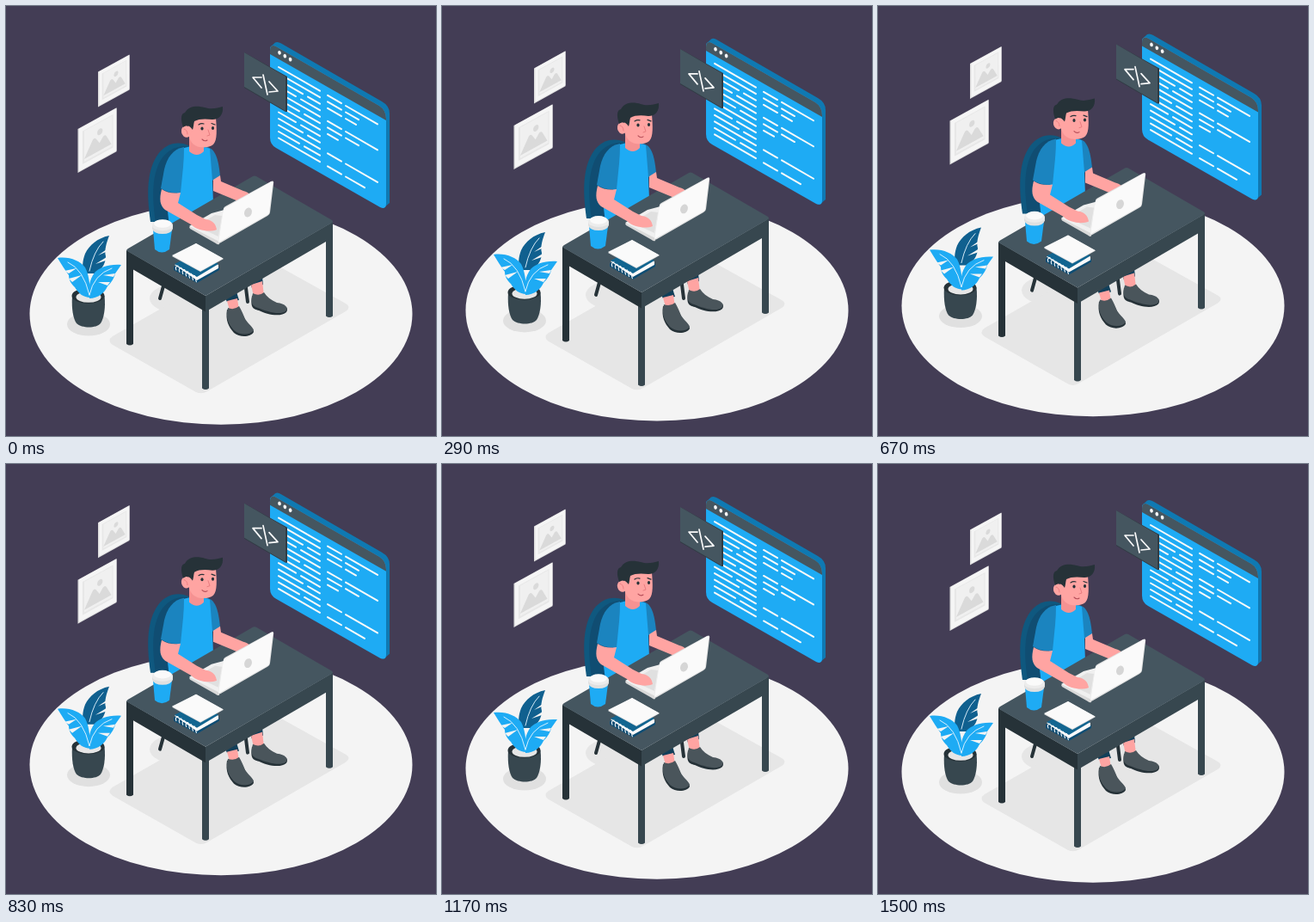
An HTML page with a canvas that plays this animation: 500x500 px, repeating every 1.54 s.

```html
<!DOCTYPE html>
<html lang="en">
<head>
<meta charset="utf-8">
<title>Developer at a desk</title>
<style>
html, body { margin: 0; width: 100%; height: 100%; overflow: hidden; background: #433d55; }
canvas { display: block; width: 100vw; height: 100vh; }
</style>
</head>
<body>
<canvas id="stage" width="500" height="500"></canvas>
<script>
const ctx = document.getElementById('stage').getContext('2d');
const LOOP = 1540, FRAMES = 37, STEP = LOOP / FRAMES;
const PEAK = 710, LANDED = 1460, RISE = 10;
const SLOPE = 0.577;
const SKIN = '#ffa4a2', BLUE = '#1eabf4', MID = '#1b84bf', DEEP = '#10608f';
const SLATE = '#455660', DARK = '#37474f', INK = '#263238', WHITE = '#fafafa';
const FLOOR = '#f4f4f4', SHADE = '#e6e6e6', SHOE = '#4a555b';

function fill(path, color) {
  ctx.fillStyle = color;
  ctx.fill(new Path2D(path));
}

function line(path, color, width = 1) {
  ctx.strokeStyle = color;
  ctx.lineWidth = width;
  ctx.stroke(new Path2D(path));
}

function oval(x, y, rx, ry, color, angle = 0) {
  ctx.fillStyle = color;
  ctx.beginPath();
  ctx.ellipse(x, y, rx, ry, angle, 0, Math.PI * 2);
  ctx.fill();
}

function picture(x, y, w, h) {
  ctx.save();
  ctx.transform(1, -0.55, 0, 1, x, y);
  fill(`M0 0H${w}V${h}H0Z`, '#dedede');
  ctx.translate(1.5, 0.5);
  ctx.scale((w - 1.5) / 44, (h - 1.5) / 50);
  fill('M0 0H44V50H0Z', '#f5f5f5');
  fill('M4 5H40V44H4Z', '#e7e7e7');
  fill('M6 6H39V42H6Z', '#f0f0f0');
  fill('M6 39L16 22Q18 20 20 23L24 30L28 25Q30 23 32 26L38 39Z', '#dadada');
  oval(24.5, 17, 3.2, 3.6, '#dadada');
  ctx.restore();
}

function textRow(row, ...segments) {
  const y = x => 71 + row * 7.5 + (x - 317) * SLOPE;
  for (const [from, to] of segments) line(`M${from} ${y(from)}L${to} ${y(to)}`, WHITE, 2);
}

function codeWindow() {
  fill('M307 48L313 42.5Q316 41 320 43.5L437 111Q446 116 446 125V229L439 235Z', '#0f79b2');
  const face = 'M307 52Q307 43.5 314 47L434 116Q442 121 442 131V230Q442 237 435 234L314 165Q307 161 307 153Z';
  fill(face, BLUE);
  ctx.save();
  ctx.clip(new Path2D(face));
  fill('M307 40L442 117V133L307 56Z', SLATE);
  ctx.restore();
  for (const i of [0, 1, 2]) oval(318 + i * 6.3, 54.3 + i * 3.9, 1.8, 2.4, WHITE, -0.3);

  const gaps = [0, 0, 345, 337, 0, 341, 0, 337, 345, 0, 341, 0];
  gaps.forEach((gap, row) => {
    if (gap) textRow(row, [317, gap], [gap + 6, 365]);
    else textRow(row, [317, 365]);
  });
  const short = [374, 390], long = [395, 432];
  for (const row of [0, 4, 9]) textRow(row, short, long);
  for (const row of [1, 5]) textRow(row, short, [395, 410]);
  textRow(2, short, [395, 407]);
  textRow(6, [374, 386]);
  textRow(11, short, [395, 417]);

  fill('M277 54L327 82V123L325 123L277 95Z', '#303b43');
  fill('M277 54L325 82V122L277 94Z', SLATE);
  line('M297 83L287 83L297 95M299 80L304 103M306 88L316 99L306 100', WHITE, 1.7);
}

function plant() {
  oval(96, 370, 25, 13.5, '#e0e0e0');
  fill('M77 337C76 351 78 364 82 369C88 375 105 375 110 369C114 363 116 350 114.5 337Z', DARK);
  oval(95.5, 337, 19, 8.8, INK);
  oval(96, 338.5, 14.5, 6.3, SHADE);

  fill('M120 267C106 270 97 278 92 288C89 296 88 304 91 311L104 311C113 305 116 298 116 291C114 284 117 275 120 267Z', DEEP);
  fill('M117 283L107 290L116 286ZM117 292L104 300L116 296Z', FLOOR);
  line('M113 274Q102 285 97 308', '#e8f6ff', 0.9);

  fill('M60 293C73 291 86 296 92 304C96 311 98 324 98 339C90 339 84 334 80 327C75 322 73 318 73 313C68 306 64 300 60 293Z', BLUE);
  fill('M134 301C119 300 109 304 103 310C97 318 95 329 97 340C107 340 115 333 118 326C123 321 126 316 127 311Z', BLUE);
  fill('M68 308L82 305L73 311ZM73 317L88 313L77 321ZM127 311L113 313L125 315ZM121 321L107 321L118 325Z', FLOOR);
  line('M72 298Q90 306 97 336M123 305Q102 312 97 336', '#e8f6ff', 0.9);
}

function feet() {
  line('M184 322L179 340M278 320L281 344', INK, 4);
  fill('M252 334L267 329L271 342L257 344Z', '#123f59');
  fill('M284 322L298 315L299 324L286 328Z', '#123f59');
  fill('M257 343L269 340L271 354L260 354Z', SKIN);
  fill('M285 324L298 320L300 337L288 338Z', SKIN);
  fill('M257 353C255 366 259 373 265 380C272 386 285 385 288 379C288 376 284 372 280 368L271 351Q264 355 257 353Z', INK);
  fill('M258 351C255 363 259 370 265 377C272 383 284 383 288 377C287 373 282 370 278 364C276 359 274 354 271 349Q265 354 258 351Z', SHOE);
  fill('M286 337C284 351 287 352 294 354C303 359 320 362 326 356Q328 353 326 350Z', INK);
  fill('M287 334C284 345 286 349 293 351C303 355 318 360 325 355C329 351 325 346 315 345C308 342 303 338 300 333Q294 338 287 334Z', SHOE);
}

function leg(x, top, bottom, color) {
  fill(`M${x} ${top}H${x + 8}V${bottom - 1}Q${x + 4} ${bottom + 2} ${x} ${bottom - 1}Z`, color);
}

function chair() {
  fill('M168 251C163 217 164 190 177 172C186 160 200 156 214 163L216 252Z', '#0f587f');
  fill('M174 252C169 219 170 193 182 176C190 166 201 161 214 164L216 252Z', '#104d72');
}

function desk() {
  leg(372, 262, 361.5, DARK);
  leg(140, 292, 394, INK);
  leg(228, 345, 445.5, DARK);
  fill('M140 284L232 337V355.5L142 303Q140 302 140 299Z', INK);
  fill('M232 337L380 251V267Q380 269 378 270.5L232 355.5Z', DARK);
  fill('M141 285Q139 284 142 282L287 198Q289 197 291 198L379 249Q381 251 379 252L232 337Z', SLATE);
}

function torso() {
  fill('M233 164C243 165 247 177 249 198Q246 202 240 203L233 185Z', MID);
  fill('M204 166C214 162 229 162 237 166L240 203L241 229L190 256L188 239L201 214Z', BLUE);
  fill('M207 164C194 166 187 177 184 190L180 212Q190 219 203 217L206 187Q207 176 207 164Z', MID);
}

function arms() {
  fill('M241 202L249 197L250 204L276 215C283 217 287 221 284 225L270 227L241 215Z', SKIN);
  fill('M181 213C178 225 179 232 185 237L215 254C223 262 238 263 245 260C244 254 241 249 232 248L222 243L200 229L203 217Q190 219 181 213Z', SKIN);
}

function head() {
  fill('M213 151L230 158V169Q222 177 213 169Z', '#f59292');
  fill('M213 130C222 126 238 125 244 130C245 143 246 156 241 161C235 166 219 166 215 157C211 151 211 140 213 130Z', SKIN);
  oval(209.5, 146, 5.6, 6.8, SKIN, -0.2);
  line('M207 143Q211 144 211 149', '#e87d80', 0.9);
  fill('M206 141C203 132 203 125 208 124C213 115 224 116 231 118C240 121 246 118 252 117C253 126 248 132 240 132C232 131 224 131 219 134C218 138 218 141 217 144C214 139 210 138 206 141Z', INK);
  oval(228, 142.5, 1.6, 2, INK);
  oval(240.5, 142, 1.6, 2, INK);
  line('M224 138Q227 136 230 137M239 136.5L243 138', INK, 1.2);
  line('M235 144L237 150L234 151', '#e87d80', 1);
  line('M228 155Q231 158 234 156', '#b64e59', 1.1);
}

function laptopBase() {
  fill('M213 257L239 242L254 238L248 277Q246 278 244 276L214 259Z', '#d9d9d9');
  fill('M213 256L239 241L254 237L248 274Z', '#f0f0f0');
  fill('M221 256L243 243L251 244L247 268Z', '#e0e0e0');
}

function laptopLid() {
  fill('M253 236Q253 234 255 233L308 204Q312 202 311 207L307 240Q307 242 304 244L250 275Q247 277 247 273Z', '#e2e2e2');
  fill('M253 235.5L308 204.5Q311 203 310 207L306 240Q306 242 303 243.5L247 275Z', WHITE);
  oval(281.5, 240, 4.3, 5.6, '#d6d6d6', 0.35);
}

function cup() {
  fill('M171 260L173 283Q181 290 190 283L193 260Z', BLUE);
  fill('M170 255V259Q172 265 182 265Q192 265 194 259V255Z', '#e0e0e0');
  oval(182, 255, 12, 6.2, '#ececec');
  oval(182, 253, 10, 4.8, WHITE);
}

function notebook() {
  fill('M195 303L223 288L248 304V307L222 322L195 307Z', '#0d4d74');
  fill('M196 301L224 287L247 301V305L222 319Z', WHITE);
  fill('M196 300L224 286L247 300L222 315Z', '#126590');
  for (let i = 0; i < 7; i++) {
    const x = 198 + i * 3.9, y = 303 + i * 2.3;
    line(`M${x + 2} ${y - 1}Q${x - 2} ${y} ${x} ${y + 4}`, WHITE, 1.1);
  }
  fill('M193 291L221 276L253 294L226 309Z', '#dedede');
  fill('M193 290L221 276L252.5 293.5L226 308Z', WHITE);
}

function scene() {
  picture(107, 76.5, 36.5, 41);
  picture(83.5, 143, 45, 51);
  oval(250, 358, 222.5, 128.7, FLOOR);
  oval(200, 340, 33, 17, SHADE);
  fill('M124 384L285 292Q291 288 298 292L395 346Q402 350 395 355L234 448Q228 452 221 449L124 394Q117 389 124 384Z', SHADE);
  codeWindow();
  plant();
  feet();
  chair();
  torso();
  desk();
  laptopBase();
  arms();
  head();
  laptopLid();
  cup();
  notebook();
}

function lift(t) {
  if (t < PEAK) return RISE * t / PEAK;
  return RISE * Math.max(0, (LANDED - t) / (LANDED - PEAK));
}

function draw(now) {
  const t = now % LOOP;
  const held = Math.floor((t + 3) / STEP) % FRAMES * STEP;
  ctx.fillStyle = '#433d55';
  ctx.fillRect(0, 0, 500, 500);
  ctx.save();
  ctx.translate(0, -lift(held));
  scene();
  ctx.restore();
}

ctx.lineCap = ctx.lineJoin = 'round';
let start;
function tick(now) {
  start ??= now;
  draw(now - start);
  requestAnimationFrame(tick);
}
draw(0);
requestAnimationFrame(tick);
</script>
</body>
</html>
```
